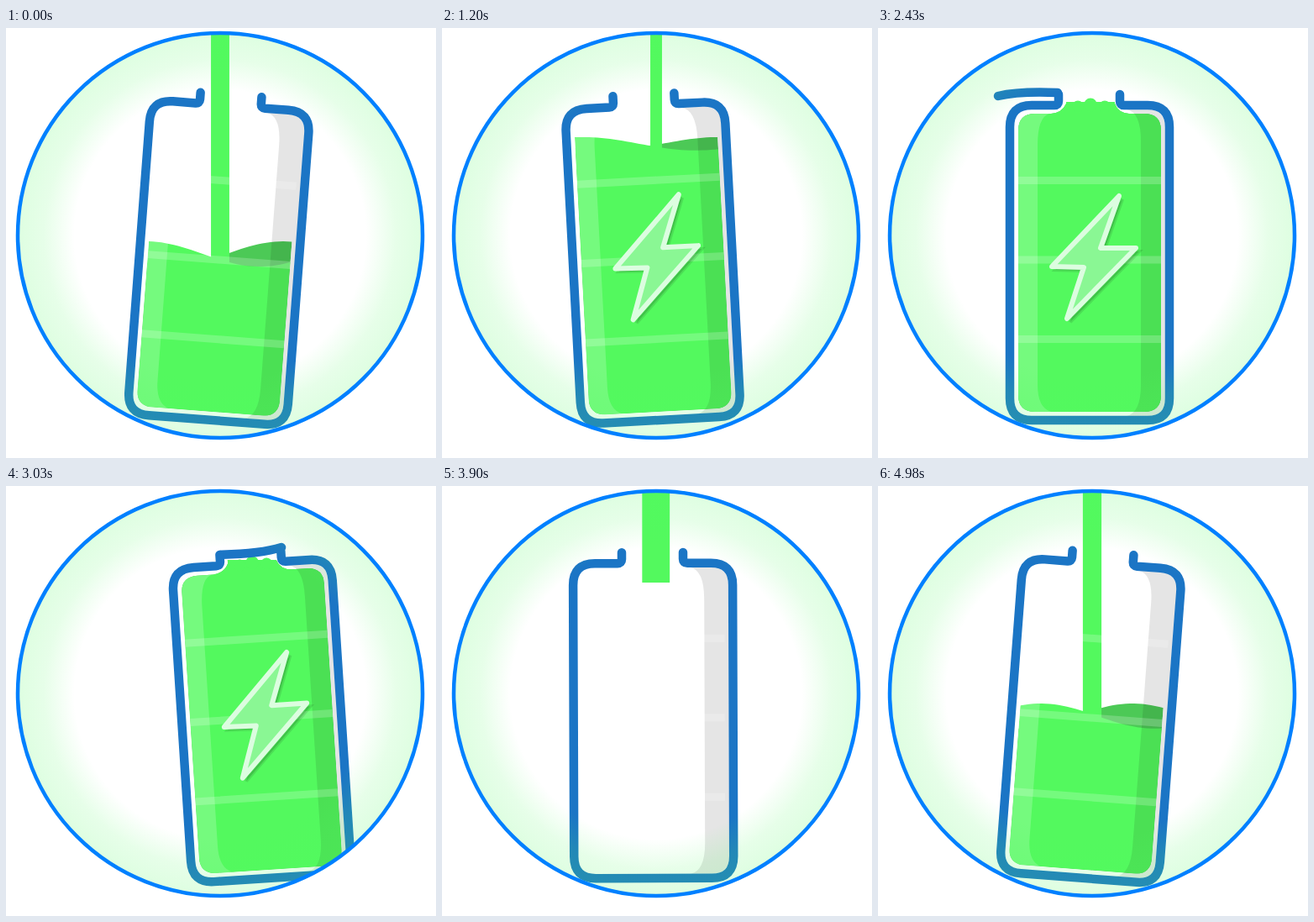
Recreate the animation shown at these times as an HTML page. Size 512x512 px, loop 5010 ms.

```html
<!DOCTYPE html>
<html lang="en">
<head>
<meta charset="utf-8">
<title>Charging battery</title>
<style>
html, body { margin: 0; width: 100%; height: 100%; overflow: hidden; background: #fff; }
svg { display: block; width: 100vw; height: 100vh; }
.wall { fill: none; stroke: #1b75c5; stroke-width: 10.5; stroke-linecap: round; stroke-linejoin: round; }
</style>
</head>
<body>
<svg viewBox="0 0 512 512">
  <defs>
    <radialGradient id="rim" gradientUnits="userSpaceOnUse" cx="255" cy="247" r="241">
      <stop offset=".72" stop-color="#50fa60" stop-opacity="0"/>
      <stop offset=".87" stop-color="#50fa60" stop-opacity=".14"/>
      <stop offset="1" stop-color="#50fa60" stop-opacity=".19"/>
    </radialGradient>
    <clipPath id="disc"><circle cx="255" cy="247" r="241"/></clipPath>
    <clipPath id="inside">
      <path d="M167 122Q167 102 187 102H206Q219 101 224 90V80H282V90Q286 101 299 102H317Q337 102 337 122V437Q337 457 317 457H187Q167 457 167 437Z"/>
    </clipPath>
    <path id="boltShape" d="M245 285L207 284L287 200L265 262H307L225 346Z"/>
  </defs>
  <g clip-path="url(#disc)">
    <g id="battery">
      <g clip-path="url(#inside)">
        <g id="liquid">
          <path id="back" fill="#4cc956"/>
          <path id="front" fill="#53f95e"/>
        </g>
        <g id="foam" fill="#53f95e">
          <circle cx="238" cy="93" r="7"/><circle cx="253" cy="91" r="8"/><circle cx="270" cy="93" r="7"/>
        </g>
      </g>
      <g id="upright"><rect id="stream" fill="#53f95e"/></g>
      <path fill="#000" fill-opacity=".1" d="M296 97Q313 100 313 135V425Q313 458 296 462H321Q342 462 342 441V118Q342 97 321 97Z"/>
      <g fill="#fff" fill-opacity=".2">
        <path d="M167 122Q167 102 187 102H204Q190 106 190 140V425Q190 452 206 457H187Q167 457 167 437Z"/>
        <path d="M167 177H337V186H167ZM167 271.500H337V280.500H167ZM167 366H337V375H167Z"/>
      </g>
      <g id="boltFill">
        <use href="#boltShape" x="4" y="4" fill="#000" fill-opacity=".14" stroke="#000" stroke-opacity=".1" stroke-width="4"/>
        <use href="#boltShape" fill="#8af794"/>
      </g>
      <use id="boltLine" href="#boltShape" fill="none" stroke="#dcfde0" stroke-width="6" stroke-linecap="round" stroke-linejoin="round"/>
      <path id="lid" class="wall"/>
      <path class="wall" d="M215 79V87Q215 92 210 92H183Q157 92 157 118V441Q157 467 183 467H321Q347 467 347 441V118Q347 92 321 92H293Q288 92 288 87V79"/>
    </g>
    <circle cx="255" cy="247" r="241" fill="url(#rim)"/>
  </g>
  <circle cx="255" cy="247" r="241" fill="none" stroke="#0080ff" stroke-width="4.500"/>
</svg>
<script>
const LOOP = 5010, ENTER = 3330, PIVOT = '252 297';
const el = {};
document.querySelectorAll('svg [id]').forEach(node => el[node.id] = node);

const set = (node, attrs) => {
  for (const name in attrs) node.setAttribute(name, attrs[name]);
};
const clamp = u => Math.min(1, Math.max(0, u));
const smooth = u => .5 - .5 * Math.cos(Math.PI * u);
const linear = u => u;

// Interpolates a list of [time, value] keys.
function track(keys, t, ease = linear) {
  if (t <= keys[0][0]) return keys[0][1];
  for (let i = 1; i < keys.length; i++) {
    const [t0, v0] = keys[i - 1], [t1, v1] = keys[i];
    if (t < t1) return v0 + (v1 - v0) * ease((t - t0) / (t1 - t0));
  }
  return keys[keys.length - 1][1];
}

const TILT = [[3540, -4], [3960, 0], [5000, 4.35], [6550, -4], [7410, 0], [7840, 0], [8080, -4]];
const LEVEL = [[3990, 475], [4380, 392], [4995, 271], [5790, 168], [6750, 99], [7150, 88]];
const SWELL = [[3990, 4], [4300, 13], [5010, 15], [5790, 11], [6750, 4], [7300, 0]];
const WIDTH = [[3870, 33], [4380, 30], [4995, 22], [5790, 15], [6750, 12.5], [7300, 9]];
const BOLT = [[5400, 0], [5790, 131], [6100, 224]];

const wave = (x, level, swell, peak) => level - swell * Math.cos((x - peak) * 2 * Math.PI / 270);

function wavePath(level, swell, peak) {
  let d = 'M130 520';
  for (let x = 130; x <= 380; x += 5) d += `L${x} ${wave(x, level, swell, peak).toFixed(2)}`;
  return d + 'L380 520Z';
}

function draw(time) {
  // One battery's life runs from its entry to its exit.
  const t = time < ENTER ? time + LOOP : time;
  const tilt = track(TILT, t, smooth);
  const slide = 370 * clamp((t - 7800) / 520) ** 2.5 - 340 * (1 - clamp((t - 3300) / 660)) ** 3;
  const drop = track([[7680, 0], [7735, 10], [7860, 0]], t, smooth);
  set(el.battery, { transform: `translate(${slide} ${drop}) rotate(${tilt} ${PIVOT})` });
  const level = track(LEVEL, t), swell = track(SWELL, t);
  const shift = .9 * (t - LOOP), peak = 167 - shift;
  const untilt = `rotate(${-tilt} ${PIVOT})`;
  set(el.liquid, { transform: untilt, display: t < 3990 ? 'none' : 'inline' });
  set(el.front, { d: wavePath(level, swell, peak) });
  set(el.back, { d: wavePath(level, swell, 330 + shift) });
  set(el.foam, {
    display: t > 7250 ? 'inline' : 'none',
    transform: `translate(0 ${track([[7250, 12], [7400, 0]], t) + Math.sin(t / 45) * .6})`
  });

  const width = track(WIDTH, t);
  const surface = wave(255, level, swell, peak) + 6;
  const end = Math.min(surface, track([[3870, 30], [4020, 455]], t));
  const top = track([[7200, 0], [7380, 100]], t);
  set(el.upright, { transform: untilt });
  set(el.stream, {
    x: 255 - width / 2, y: top, width, height: Math.max(0, end - top),
    display: t < 3870 ? 'none' : 'inline'
  });

  const half = track(BOLT, t);
  set(el.boltLine, {
    display: half ? 'inline' : 'none',
    'stroke-dasharray': half > 220 ? 'none' : `0 ${Math.max(0, 211 - half)} ${2 * half} 900`
  });
  set(el.boltFill, { opacity: track([[5740, 0], [5790, .06], [6150, 1]], t) });

  const grown = track([[7290, 0], [7410, 1]], t, smooth);
  const swing = 180 * clamp((t - 7450) / 250) ** 2;
  set(el.lid, {
    display: grown ? 'inline' : 'none',
    d: `M214 77Q${214 - 46 * grown} ${77 - 2 * grown} ${214 - 71 * grown} ${77 + 4 * grown}`,
    transform: `rotate(${swing} 216 78)`
  });
}

function tick(now) {
  const time = Math.floor(now % LOOP / 30) * 30;
  draw(time < 90 ? 0 : time);
  requestAnimationFrame(tick);
}
draw(0);
requestAnimationFrame(tick);
</script>
</body>
</html>
```
